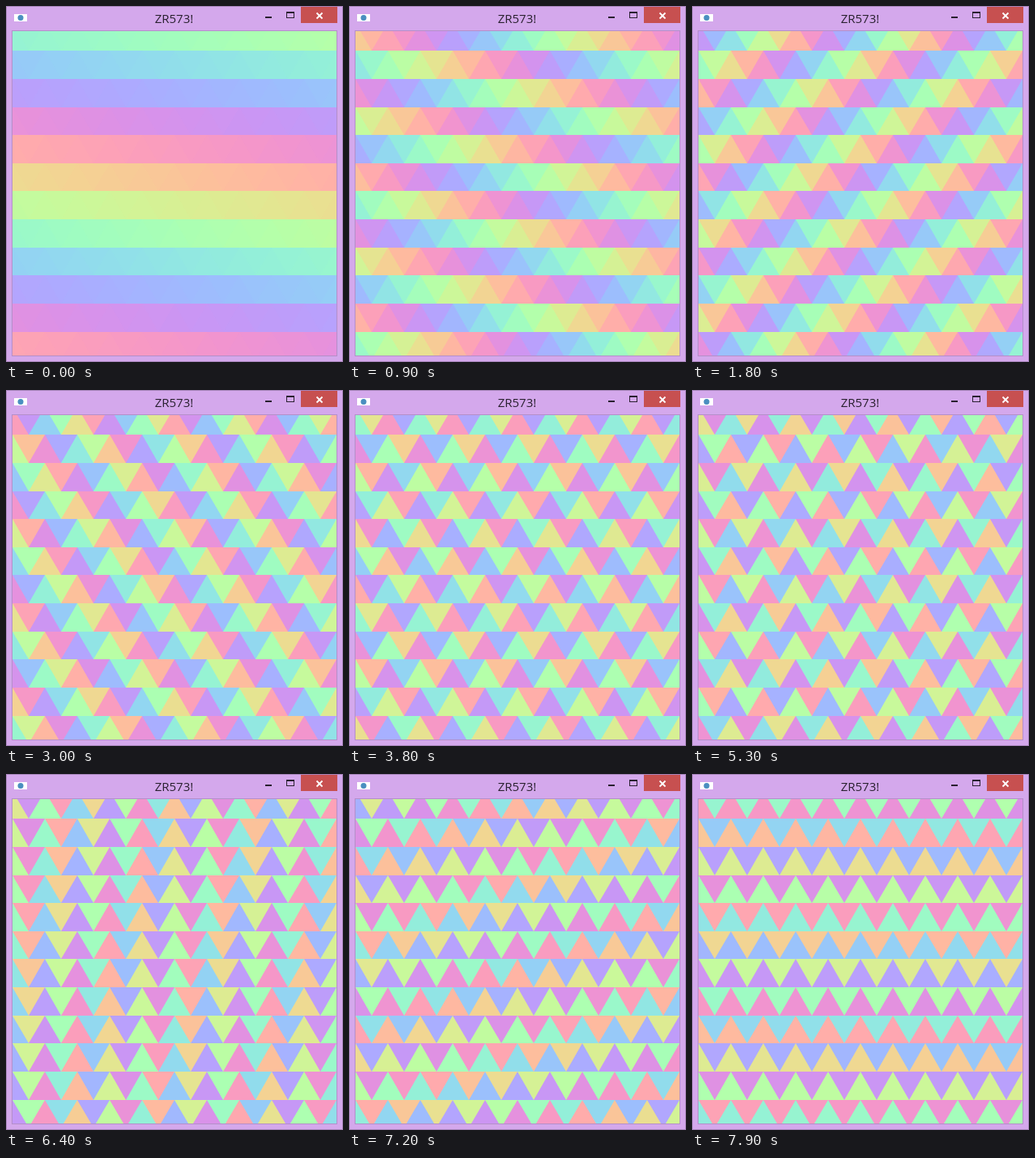
Animation, 416 px wide and 439 px high, one loop 8 s. Source, as an HTML page with a canvas:

```html
<!DOCTYPE html>
<html lang="en">
<head>
<meta charset="utf-8">
<title>Triangles</title>
<style>
  html, body { margin: 0; width: 416px; height: 439px; overflow: hidden; background: #d4a8ec; }
  svg, canvas { position: absolute; left: 0; top: 0; display: block; }
  canvas { left: 8px; top: 31px; }
  text { font: 15px "Open Sans", "Noto Sans", sans-serif; fill: #2a2130; text-anchor: middle; }
</style>
</head>
<body>
<svg width="416" height="439">
  <rect x=".5" y=".5" width="415" height="438" fill="none" stroke="#a583b8"/>
  <rect x="7.5" y="30.5" width="401" height="401" fill="none" stroke="#b48fc9"/>
  <rect x="10" y="10" width="16" height="9" fill="#fff"/>
  <circle cx="18" cy="14.5" r="3.5" fill="#4a8fc0"/>
  <text x="207.5" y="21">ZR573!</text>
  <rect x="320" y="13" width="8" height="2" fill="#2a2130"/>
  <path d="M346 7h10v8h-10zM347 9v5h8v-5z" fill="#2a2130" fill-rule="evenodd"/>
  <rect x="364" y="1" width="45" height="20" fill="#c75050"/>
  <path d="M383.5 8.5l7 7m0-7l-7 7" stroke="#fff" stroke-width="1.8"/>
</svg>
<canvas width="400" height="400"></canvas>
<script>
const ctx = document.querySelector('canvas').getContext('2d');
const HALF = 20, ROW_H = HALF * Math.sqrt(3);
const PER_ROW = 22, ROWS = 12, BOTTOM_TOP = 370.7;
const FIRST = 2 * PER_ROW; // two rows lie below the visible area
const STEP_MS = 100, STEPS = 80;

const wave = a => Math.round(200 + 55 * Math.sin(a));
const rainbow = a => `rgb(${wave(a)},${wave(a + 2.05)},${wave(a + 4.1)})`;

// Each cell is filled from its slanted left edge to the far right; the next one covers the excess.
function cell(row, col, color) {
  const top = Math.round(BOTTOM_TOP - row * ROW_H);
  const bottom = Math.round(BOTTOM_TOP - (row - 1) * ROW_H);
  const x = (col - 2) * HALF;
  const lean = col % 2 * HALF;
  ctx.fillStyle = color;
  ctx.beginPath();
  ctx.moveTo(x + lean, top);
  ctx.lineTo(440, top);
  ctx.lineTo(440, bottom);
  ctx.lineTo(x + HALF - lean, bottom);
  ctx.fill();
}

function draw(now) {
  const step = Math.floor(now / STEP_MS) % STEPS;
  const freq = (step + 1) * Math.PI / 79;
  for (let row = 0; row < ROWS; row++)
    for (let col = 0; col < PER_ROW; col++)
      cell(row, col, rainbow(freq * (FIRST + row * PER_ROW + col)));
  requestAnimationFrame(loop);
}

const start = performance.now();
function loop() {
  draw(performance.now() - start);
}
loop();
</script>
</body>
</html>
```
